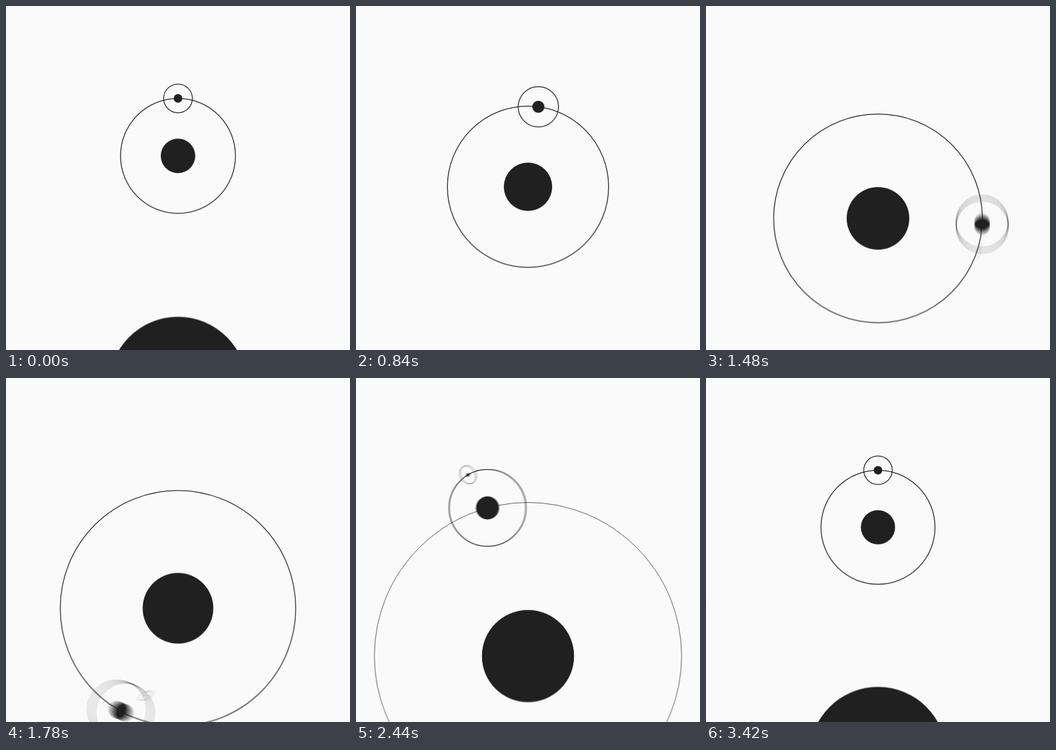
Recreate the animation shown at these times as an HTML page with a canvas. Size 540x540 px, loop 3440 ms.

```html
<!DOCTYPE html>
<html lang="en">
<head>
<meta charset="utf-8">
<title>Nested orbits</title>
<style>
html, body { margin: 0; width: 100%; height: 100%; overflow: hidden; background: #fafafa; }
canvas { display: block; width: 540px; height: 540px; }
</style>
</head>
<body>
<canvas id="stage" width="540" height="540"></canvas>
<script>
const SIZE = 540;
const LOOP = 3440;
const STEP = 20;
const SAMPLES = 8;
const SHUTTER = 0.66;
const TAU = Math.PI * 2;
const INK = '#202020';
const PAPER = '#fafafa';
const LINE = 1.25;

const screen = document.getElementById('stage').getContext('2d');
const layer = document.createElement('canvas');
layer.width = layer.height = SIZE;
const ctx = layer.getContext('2d');

const clamp = v => Math.min(1, Math.max(0, v));

function ease(p, power = 4.5) {
  return p < 0.5
    ? 0.5 * (2 * p) ** power
    : 1 - 0.5 * (2 * (1 - p)) ** power;
}

function disc(x, y, r) {
  if (r <= 0) return;
  ctx.beginPath();
  ctx.arc(x, y, r, 0, TAU);
  ctx.fill();
}

function ring(x, y, r, weight = LINE, squash = 1, angle = 0) {
  if (weight < 0.01) return;
  ctx.lineWidth = weight;
  ctx.beginPath();
  ctx.ellipse(x, y, r * squash, r, angle, 0, TAU);
  ctx.stroke();
}

const orbit = (x, y, r, angle) => [x + r * Math.sin(angle), y - r * Math.cos(angle)];

function drawScene(p) {
  ctx.fillStyle = PAPER;
  ctx.fillRect(0, 0, SIZE, SIZE);
  ctx.fillStyle = ctx.strokeStyle = INK;

  // The zoom is centred on (270, 115), where the nested bodies converge.
  const scale = 4 ** p;
  const angle = TAU * ease(p);
  const r = 90 * scale;
  const x = 270;
  const y = 115 + 120 * scale;
  const [moonX, moonY] = orbit(x, y, r, angle);
  const [dotX, dotY] = orbit(moonX, moonY, r / 4, 2 * angle);
  const grow = clamp((p - 1 / 3) * 1.5);

  disc(x, 115 + 480 * scale, 108 * scale);
  ring(x, y, r, LINE * clamp(2 * (1 - p)));
  disc(x, y, r * 0.3);
  ring(moonX, moonY, r / 4);
  disc(moonX, moonY, r * 0.075);

  // The newest body turns face-on as it appears.
  ring(dotX, dotY, r / 16, LINE * grow, Math.sin(grow * Math.PI / 2), 2 * angle);
  disc(dotX, dotY, r * 0.01875 * grow);
}

function render(time) {
  const frame = Math.floor((time % LOOP) / STEP);
  for (let i = 0; i < SAMPLES; i++) {
    drawScene((frame + SHUTTER * i / SAMPLES) * STEP / LOOP);
    screen.globalAlpha = 1 / (i + 1);
    screen.drawImage(layer, 0, 0);
  }
}

const start = performance.now();
function tick() {
  render(performance.now() - start);
  requestAnimationFrame(tick);
}
tick();
</script>
</body>
</html>
```
